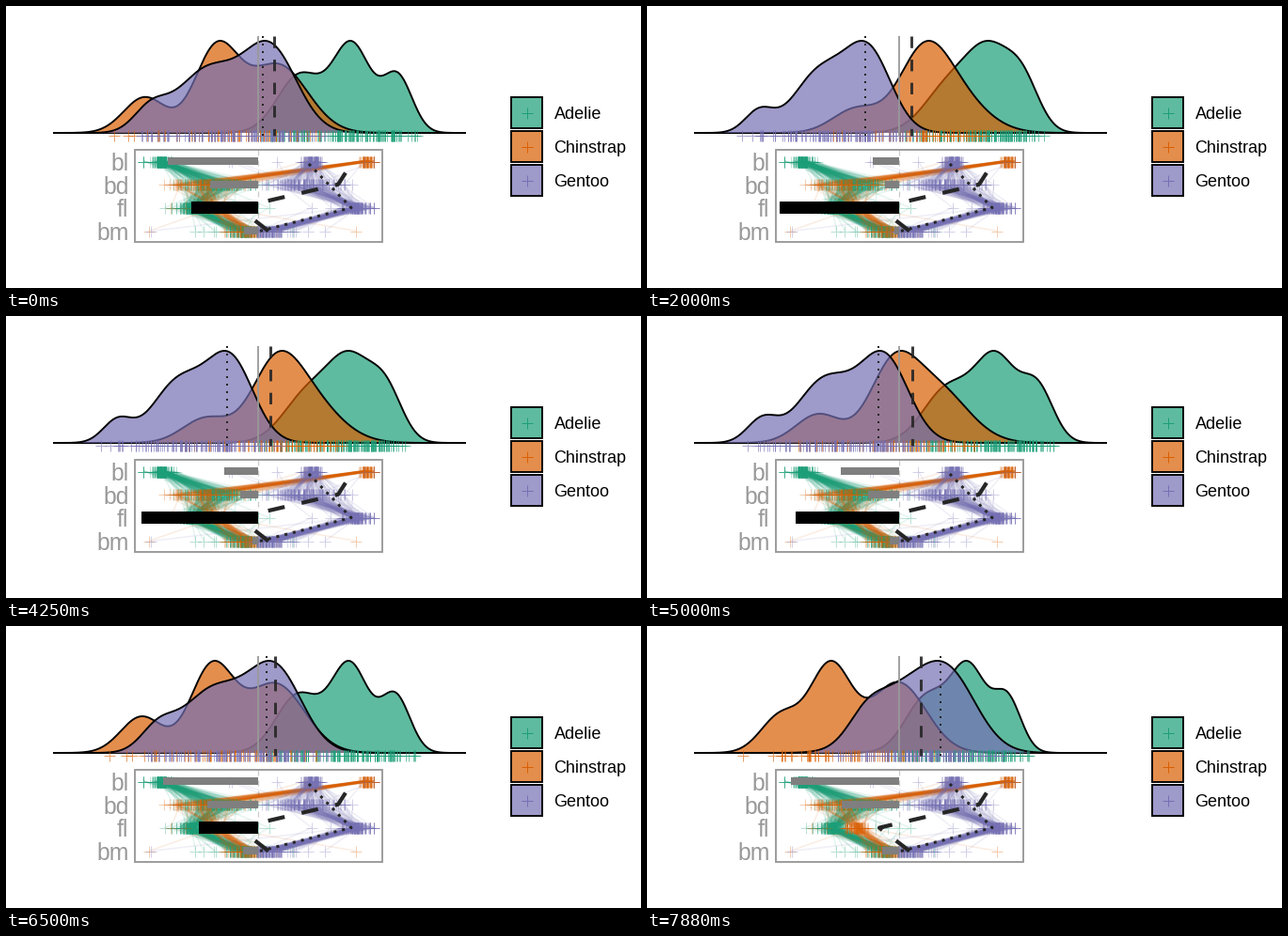
Animation, 675 px wide and 300 px high, one loop 8000 ms. Source, as a matplotlib script:

```python
import numpy as np
import matplotlib.pyplot as plt
from matplotlib.animation import FuncAnimation
from matplotlib.collections import LineCollection
from matplotlib.patches import Rectangle

W, H, DPI = 675, 300, 100
PX = 72 / DPI
FRAMES, INTERVAL = 64, 125
GREY, INK = "#999999", "#262626"

LEFT, RIGHT = 50, 489   # span of the densities
BASE, PEAK = 135, 37    # density floor and top
ORIGIN = 292            # data centre of the projection
ZERO, UNIT = 268, 131   # basis axis
ROWS = 165 + 24.8 * np.arange(4)
FEATURES = ["bl", "bd", "fl", "bm"]
TURN = 2                # the feature being rotated

# Radial tour in steps of a quarter radian: turn fully in, then fully out
STEP = 0.25
ANGLES = np.r_[np.pi / 2 - STEP * np.arange(4, -1, -1), STEP * np.arange(6, -1, -1)]
STARTS = np.r_[0, 500 + 750 * np.arange(10), 7875]
REST = np.array([0.875, 0.467, 0, 0.14])   # basis without the turned feature

# name, colour, count, spread ratio, clusters, attribution means.
# A cluster is mass, mean on fl, mean on the rest, spread on fl.
SPECIES = [
    ("Adelie", "#1B9E77", 146, 0.82,
     [(18, 62, 50, 23), (14, 30, 5, 27), (9, 88, 91, 18)], [166, 222, 198, 252]),
    ("Chinstrap", "#D95F02", 68, 0.84,
     [(22, 25, -97, 26), (24, 34, -25, 35), (9, -34, -150, 25)], [383, 208, 222, 257]),
    ("Gentoo", "#7570B3", 119, 1.25,
     [(24, -66, 29, 24), (20, -106, -25, 27), (4, -163, -60, 15)], [325, 316, 373, 281]),
]
SPREAD = [5, 19, 6, 8]

rng = np.random.default_rng(7)
grid = np.linspace(LEFT, RIGHT, RIGHT - LEFT + 1)


def density(clusters, ratio, s, c):
    total = 0
    for mass, f, w, sd in clusters:
        sd *= np.hypot(s, c * ratio)
        z = (grid - ORIGIN - s * f - c * w) / sd
        total = total + mass / sd * np.exp(-z * z / 2)
    return BASE - (BASE - PEAK) * total / total.max()


def sample(clusters, ratio, n):
    parts = np.array(clusters, float)
    pick = parts[rng.choice(len(parts), n, p=parts[:, 0] / parts[:, 0].sum())]
    noise = np.clip(rng.normal(size=(n, 2)), -1.9, 1.9)
    return pick[:, 1:3] + noise * pick[:, 3:] * [1, ratio]


def attribution(mean, n):
    x = mean + rng.normal(size=(n, 4)) * SPREAD
    x += (rng.random((n, 4)) < 0.07) * rng.normal(0, 35, (n, 4))
    return np.clip(x, 146, 391)


def crosses(x, y, color, alpha, z):
    return ax.plot(x, y, "+", color=color, alpha=alpha, ms=12 * PX,
                   mew=PX, zorder=z)[0]


def stroke(x, y, lw, z, color=INK, dash=None, **kw):
    style = (0, (dash[0] / lw, dash[1] / lw)) if dash else "-"
    return ax.plot(x, y, color=color, lw=lw * PX, ls=style, zorder=z,
                   dash_capstyle="butt", solid_capstyle="butt", **kw)[0]


def box(x, y, w, h, z, **kw):
    return ax.add_patch(Rectangle((x, y), w, h, zorder=z, **kw))


def label(x, y, text, size, **kw):
    ax.text(x, y, text, fontsize=size * PX, va="baseline",
            family="Liberation Sans", **kw)


fig = plt.figure(figsize=(W / DPI, H / DPI), dpi=DPI, facecolor="white")
ax = fig.add_axes([0, 0, 1, 1])
ax.set_xlim(0, W)
ax.set_ylim(H, 0)
ax.axis("off")

stroke([ZERO] * 2, [153, 251], 1.3, 1, "#CCCCCC", (6, 5))

fills, edges, rugs, clouds = [], [], [], []
for i, (name, color, n, ratio, clusters, means) in enumerate(SPECIES):
    # Density and rug
    fills.append(ax.fill([LEFT, RIGHT, RIGHT], [BASE] * 3, color=color,
                         alpha=0.7, lw=0, zorder=2 + i)[0])
    edges.append(stroke([], [], 1.9, 2.5 + i, "black"))
    rugs.append(crosses([], [], color, 0.6, 6))
    clouds.append(sample(clusters, ratio, n))

    # Parallel coordinates
    x = attribution(means, n)
    ax.add_collection(LineCollection([np.column_stack([r, ROWS]) for r in x],
                                     colors=color, alpha=0.11, lw=1.6 * PX, zorder=3))
    crosses(x.ravel(), np.tile(ROWS + 0.5, n), color, 0.3, 4)

    # Legend
    y = 113.5 + 36 * i
    box(537, y - 16.5, 33, 33, 1, fc=color, alpha=0.7, lw=0)
    box(537, y - 16.5, 33, 33, 3, fill=False, ec="black", lw=1.9 * PX)
    crosses([553.5], [y], color, 1, 4)
    label(582.5, y + 6.5, name, 18)

# Two highlighted observations: projected above, profiled below
stroke([ZERO] * 2, [32, 139], 1.8, 7, GREY)
marks = [
    (stroke([0, 0], [32, 138], 2, 8, dash=(2, 6)), -67, 20),
    (stroke([0, 0], [32, 138], 3, 8, dash=(12.3, 12.3), alpha=0.9), -11, -1),
]
stroke([270, 367, 343, 319], ROWS[::-1], 3, 5, dash=(3, 6))
stroke([279, 247, 353, 369], ROWS[::-1], 4.2, 5, dash=(18, 18.5))

box(137, 153, 263, 98, 6, fill=False, ec=GREY, lw=1.9 * PX)
bars = []
for k, (name, y) in enumerate(zip(FEATURES, ROWS)):
    tall, color = (13, "black") if k == TURN else (8, "#7F7F7F")
    bars.append(box(ZERO, y - tall / 2, 0, tall, 7, fc=color, lw=0))
    label(130.5, y + 9.7, name, 24.7, ha="right", color=GREY)


def update(frame):
    state = np.searchsorted(STARTS, frame * INTERVAL, side="right") - 1
    s, c = np.sin(ANGLES[state]), np.cos(ANGLES[state])

    for spec, fill, edge, rug, cloud in zip(SPECIES, fills, edges, rugs, clouds):
        y = density(spec[4], spec[3], s, c)
        fill.set_xy(np.column_stack([np.r_[LEFT, grid, RIGHT], np.r_[BASE, y, BASE]]))
        edge.set_data(grid, y)
        x = np.clip(ORIGIN + cloud @ [s, c], LEFT, RIGHT)
        rug.set_data(x, np.full(len(x), 137.5))

    for line, f, w in marks:
        line.set_xdata([ORIGIN + s * f + c * w] * 2)

    basis = c * REST
    basis[TURN] = s
    for bar, size in zip(bars, UNIT * basis):
        bar.set_x(ZERO - size)
        bar.set_width(size)
    return [*fills, *edges, *rugs, *bars]


anim = FuncAnimation(fig, update, frames=FRAMES, interval=INTERVAL,
                     repeat=True, repeat_delay=0, blit=False)
plt.show()
```
